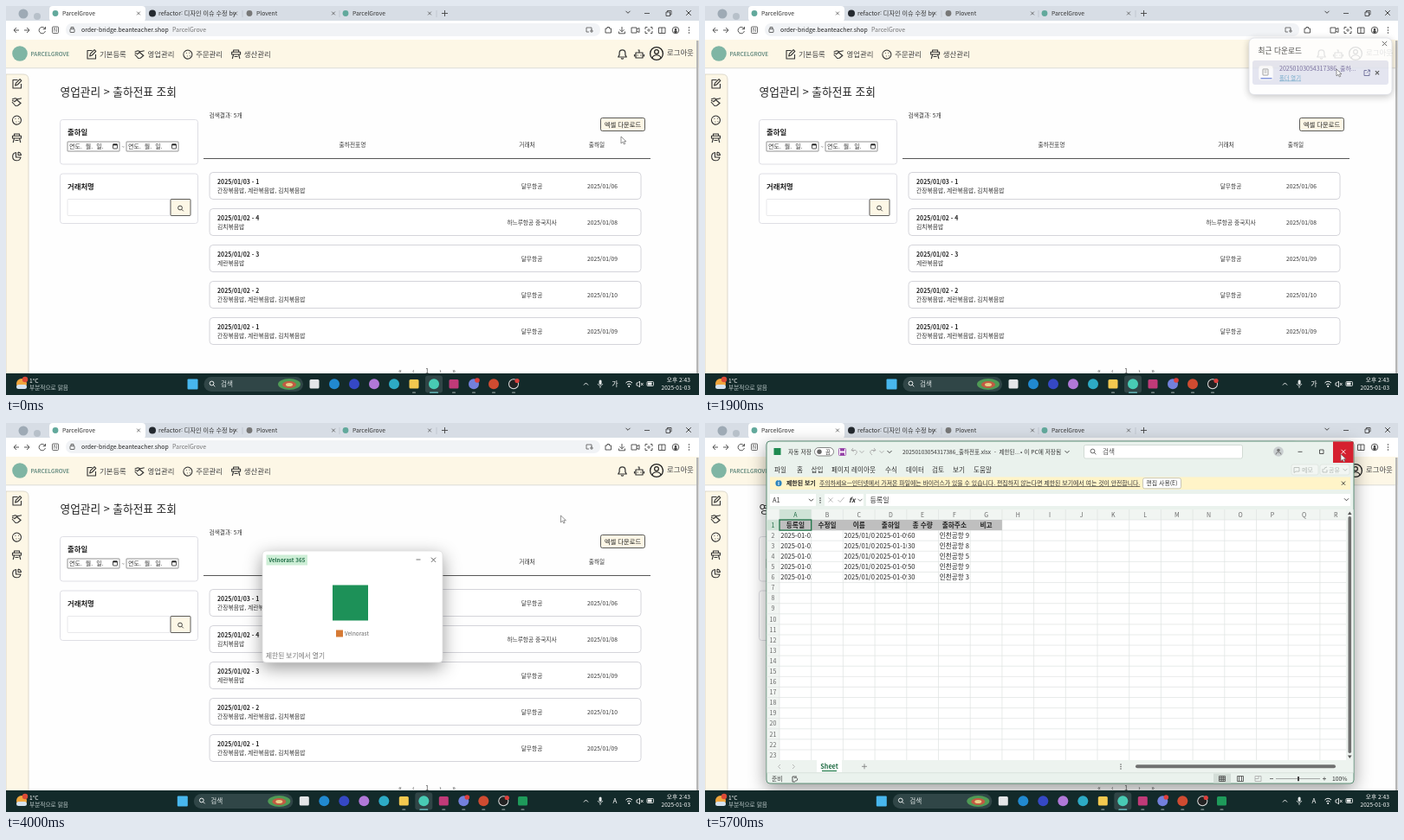
An HTML page for the animation above (5.8 s loop, 800 px wide and 450 px high).

```html
<!DOCTYPE html>
<html lang="ko">
<head>
<meta charset="utf-8">
<style>
html, body { margin: 0; width: 100%; height: 100%; overflow: hidden; background: #fff; }
svg { display: block; }
text { font-family: "Noto Sans CJK KR", "Noto Sans", sans-serif; white-space: pre; }
.soft { filter: drop-shadow(0 2px 4px #0004); }
.deep { filter: drop-shadow(0 6px 10px #0006); }
</style>
</head>
<body>
<svg id="stage" width="800" height="450" viewBox="0 0 800 450"></svg>
<script>
const LOOP = 5800, INK = '#333', CREAM = '#fdf7e6';

// Drawing helpers, each returns SVG markup
const rect = (x, y, w, h, fill, more = '') =>
  `<rect x="${x}" y="${y}" width="${w}" height="${h}" fill="${fill}" ${more}/>`;
const box = (x, y, w, h, r, fill, stroke, more = '') =>
  rect(x, y, w, h, fill, `rx="${r}" stroke="${stroke}" stroke-width=".8" ${more}`);
const disc = (x, y, r, fill, more = '') => `<circle cx="${x}" cy="${y}" r="${r}" fill="${fill}" ${more}/>`;
const ring = (x, y, r, stroke = INK, w = 1) => disc(x, y, r, 'none', `stroke="${stroke}" stroke-width="${w}"`);
const line = (d, stroke = INK, w = 1, x = 0, y = 0) =>
  `<path d="${d}" transform="translate(${x} ${y})" fill="none" stroke="${stroke}" stroke-width="${w}" stroke-linejoin="round"/>`;
const text = (x, y, s, size = 6.7, fill = INK, more = '') =>
  `<text x="${x}" y="${y}" font-size="${size}" fill="${fill}" ${more}>${s}</text>`;
const group = (id, body, more = '') => `<g id="${id}" ${more}>${body}</g>`;
const each = (list, fn) => list.map(fn).join('');
const MID = 'text-anchor="middle"', END = 'text-anchor="end"', BOLD = 'font-weight="700"', SEMI = 'font-weight="500"';
const cross = (x, y, r = 2.5, c = INK, w = .9) => line(`M${-r} ${-r}L${r} ${r}M${r} ${-r}L${-r} ${r}`, c, w, x, y);
const chevron = (x, y, c = INK) => line('M-2.5-1.2L0 1.3L2.5-1.2', c, .9, x, y);
const lens = (x, y, c = INK) => ring(x - .5, y - .5, 2.4, c, .9) + line('M1.3 1.3L3.3 3.3', c, .9, x, y);

const icons = {
  edit: 'M1-4.5H-4.5V5H5V0M-1.8 2L-1-.8L3.6-5.3L5.3-3.6L.8 1Z',
  deal: 'M-5.5-3L-2-4.2L1-3.2L5.5-4.2M-5.5 0L-1.5 4.5L1 4.2L5 1M-3 0L0-2.5L4.5 1.5M-5.5-1.5L-3-1',
  order: 'M-2-4.5A5 5 0 1 1-4.7 1.8A5 5 0 0 1-2-4.5M-2-1.5h.8M1.5-1.8h.8M-1 2h.8M2 1.8h.8',
  make: 'M-5-2.8H5V0H-5ZM-3 0L-4.3 5M3 0L4.3 5M-3-2.8V-5H3V-2.8M-2 2.5H2',
  pie: 'M-1-4.5A4.7 4.7 0 1 0 4.5 1H-1ZM1.5-5V-1.5H5A4 4 0 0 0 1.5-5',
  bell: 'M-4.8 3H4.8L3.4 .6V-1.5A3.4 3.6 0 0 0-3.4-1.5V.6ZM-1.3 4.2A1.4 1.4 0 0 0 1.3 4.2',
  bot: 'M-4-2H4V4H-4ZM-5.5 0V2.5M5.5 0V2.5M0-2V-5H-1.5M-1.8 .6V1.4M1.8 .6V1.4'
};
const icon = (name, x, y, w = 1.1) => line(icons[name], INK, w, x, y);

function browser() {
  const tab = (x, s, c) => disc(x, 8.5, 3.4, c) + text(x + 8, 11.2, s, 6.8);
  return rect(0, 0, 800, 18, '#d7dde5') +
    disc(20, 9, 5.5, '#9eaab5') + disc(36, 12, 4, '#b7c0c9') +
    rect(50, 0, 111, 18, '#fff', 'rx="4"') + rect(0, 17, 800, 22, '#fff') +
    tab(57, 'ParcelGrove', '#62a99c') + disc(169, 8.5, 4, '#24292f') +
    text(176, 11.2, 'refactor: 디자인 이슈 수정 by', 7.1) + tab(281, 'Plovent', '#777') + tab(392, 'ParcelGrove', '#62a99c') +
    each([153, 265, 378, 489], x => cross(x, 8.5, 1.9, '#555', .8)) +
    line('M273 5V13M385 5V13M497 5V13', '#b3bbc4', .6) + line('M503 8.5H510M506.5 5V12', '#444', .9) +
    chevron(718, 7) + line('M737 8.5H743M762 7H766.5V11.5H762ZM763.5 7V5.5H768V10H766.5', INK, .8) + cross(788, 8, 2.8) +
    line('M12 25L9 28L12 31M9 28H15M24 25L27 28L24 31M21 28H27', '#444', .9) +
    line('M45 26.2A3.7 3.7 0 1 0 45.4 29M45.5 24V26.8H42.7', '#444', .9) +
    box(53.5, 24, 7, 7.5, 1, '#fff', '#444') + text(57, 30, 'N', 5.5, INK, MID) +
    rect(69, 20, 617, 15, '#f1f3f6', 'rx="7"') + box(74, 26.5, 5, 4, .5, 'none', '#444') + line('M75 26.5V24.5H78V26.5', '#444', .8) +
    text(87, 30.3, 'order-bridge.beanteacher.shop', 6.9, '#222') + text(192, 30.3, 'ParcelGrove', 7, '#777') +
    line('M670 25H676V28M670 25V30H673M674 29H678M676 27V31', '#555', .8) +
    line('M692 26H694V24.5H696.5V26H698.5V31H692ZM722 25H728V31H722ZM728 27L731 25.5V30.5L728 29M738 27V24.5H740.5M744 24.5H746V27M746 29V31.5H744M740.5 31.5H738V29M753.5 25H761V31.5H753.5ZM757 25V31.5', '#444', .9) +
    group('getIcon', line('M711 24V29.5M708.5 27.3L711 29.8L713.5 27.3M707.5 29.5V31.8H714.5V29.5', '#444', .9)) +
    ring(742, 28, 1.2, '#444', .8) + ring(773, 28, 3.8, '#444', .9) + disc(773, 27, 1.3, '#444') + disc(773, 29.8, 1.8, '#444') +
    each([25, 28, 31], y => disc(788.5, y, .8, '#444'));
}

function page() {
  const rows = [
    ['03 - 1', '간장볶음밥, 계란볶음밥, 김치볶음밥', '달무항공', '06'],
    ['02 - 4', '김치볶음밥', '하느루항공 중국지사', '08'],
    ['02 - 3', '계란볶음밥', '달무항공', '09'],
    ['02 - 2', '간장볶음밥, 계란볶음밥, 김치볶음밥', '달무항공', '10'],
    ['02 - 1', '간장볶음밥, 계란볶음밥, 김치볶음밥', '달무항공', '09']];
  const names = ['edit', 'deal', 'order', 'make'];
  const date = x => box(x, 157, 60, 11, .5, '#fff', '#777') + text(x + 2, 165.2, '연도. 월. 일.', 7, INK, 'word-spacing="2"') +
    box(x + 52.5, 160, 5, 5, .5, 'none', '#222') + rect(x + 52.5, 159.5, 5, 1.8, '#222');
  return rect(0, 39, 800, 386, '#fefefe') + rect(0, 39, 800, 32.5, CREAM) + line('M0 71.8H797', '#d3d3cd', .8) +
    disc(16, 55, 8.8, '#7fb5a4') + text(28.5, 57.5, 'PARCELGROVE', 6.6, '#35695f', SEMI) +
    each(['기본등록', '영업관리', '주문관리', '생산관리'], (s, i) =>
      icon(names[i], 98.5 + 55.7 * i, 56) + text(108 + 55.6 * i, 58.8, s, 8.4, '#444')) +
    icon('bell', 711.5, 56, 1.2) + icon('bot', 731, 56, 1.2) + ring(751, 55, 7.4, '#222', 1.3) +
    ring(751, 53, 2.4, '#222', 1.2) + line('M746 60A5.2 4.5 0 0 1 756 60', '#222', 1.2) +
    text(763, 57, '로그아웃', 8.4, '#444') + rect(797, 40, 2.5, 385, '#b5b5b5') +
    `<path d="M0 79H20Q26 79 26 85V425H0Z" fill="${CREAM}" stroke="#d5d0c2" stroke-width=".8"/>` +
    each([...names, 'pie'], (n, i) => icon(n, 12.5, 90 + 21 * i)) +
    text(62.5, 104, '영업관리 &gt; 출하전표 조회', 12.7, '#222', SEMI) +
    box(62.5, 131.5, 159, 51.5, 3, '#fff', '#d6d6de') + text(71, 149.2, '출하일', 8.4, '#222', BOLD) +
    date(71) + text(133.5, 165, '~', 6) + date(139) +
    box(62.5, 194, 159, 57.5, 3, '#fff', '#d6d6de') + text(71, 211.8, '거래처명', 8.4, '#222', BOLD) +
    box(71, 223.5, 119, 19, 1, '#fff', '#e2e2e6') + box(190, 223.5, 23, 19, 1, CREAM, '#333') + lens(201.5, 234) +
    text(234.5, 128.8, '검색결과: 5개') +
    box(686.5, 129.5, 51, 15, 2, CREAM, '#333') + text(712, 139.7, '엑셀 다운로드', 7.3, '#222', MID) +
    text(400, 163.2, '출하전표명', 6.7, INK, MID) + text(601.5, 163.2, '거래처', 6.7, INK, MID) + text(682, 163.2, '출하일', 6.7, INK, MID) +
    line('M228 176.5H744', '#444', .9) +
    each(rows, ([no, menu, who, day], i) => {
      const y = 192.5 + 42 * i;
      return box(235, y, 498, 31, 4, '#fff', '#c9c9d1') + text(244, y + 13, '2025/01/' + no, 6.9, '#222', BOLD) +
        text(244, y + 23.3, menu, 6.8) + text(607, y + 18.3, who, 6.7, INK, MID) +
        text(688.5, y + 18.3, '2025/01/' + day, 6.7, INK, MID);
    }) +
    each(['«', '‹', '1', '›', '»'], (s, i) => text(455 + 15.5 * i, 424.6, s, 7.5, '#444', MID));
}

function popup() {
  return box(628, 37, 165, 65.5, 6, '#fff', '#d9dbe2', 'class="soft"') +
    text(638.5, 54.5, '최근 다운로드', 8.7, INK, SEMI) + cross(784.5, 43.5, 2.6, '#444') +
    rect(632, 63, 157, 28, '#e0e2ee', 'rx="3" id="hover"') +
    box(639, 69, 17, 17, 3, '#fafafc', '#e6e6ec') + box(644, 73, 6, 7, .5, '#fff', '#777') + line('M645.5 75H648.5M645.5 77H648.5', '#777', .7) +
    rect(641.5, 83, 13, 1.4, '#6d83d6') +
    group('fileFull', text(663, 75, '20250103054317386_출하전표.xlsx', 7, '#777')) +
    group('fileHot', text(663, 75, '20250103054317386_출하...', 7, '#665b92') +
      text(663, 85.5, '폴더 열기', 6.3, '#5b9ac0', 'text-decoration="underline"') +
      line('M764 74.5H761V80.5H767V77.5M765 74H767.5V76.5M767.5 74L764 77.5', '#55568a', .9) + cross(776, 77.3, 2.1, '#444', 1.2));
}

function splash() {
  return box(296, 148, 208, 129, 4, '#fff', '#ddd', 'class="deep" id="panel"') +
    group('splashBody', rect(300.5, 152.5, 47.5, 12, '#cdeed6') + text(324.3, 161, 'Velnorast 365', 6.3, '#24704a', MID + BOLD) +
      line('M473.5 158H478.5', '#555', .8) + cross(493.5, 158.3, 2.6, '#555') +
      rect(377, 187.5, 41, 41, '#1d9158') + rect(381, 239.5, 8, 8, '#d67a35') + text(391, 246.3, 'Velnorast', 6.4, '#666', SEMI) +
      text(300, 272, '제한된 보기에서 열기', 7.7, '#777'));
}

function sheet() {
  const W = 36.7, H = 12.09, X = 86, Y = 112;
  const menus = [[80, '파일'], [106, '홈'], [122.5, '삽입'], [146, '페이지 레이아웃'], [208, '수식'], [232, '데이터'], [262, '검토'], [286, '보기'], [310, '도움말']];
  const amounts = [60, 30, 10, 50, 30], gates = [9, 8, 5, 9, 3];
  const cell = (c, r, s) => `<svg x="${X + W * c}" y="${Y + H * r}" width="${W}" height="${H}">${text(1.2, 8.9, s, 7.6, '#222')}</svg>`;
  let grid = '', marks = '';
  for (let c = 0; c < 18; c++) {
    grid += `M${X + W * c} 100V390`;
    marks += text(X + W * (c + .5), 108.7, String.fromCharCode(65 + c), 7, c ? '#666' : '#1f6b43', MID);
  }
  for (let r = 0; r < 23; r++) {
    grid += `M71 ${Y + H * r}H740`;
    marks += text(78.5, Y + 8.7 + H * r, r + 1, 7, r ? '#666' : '#1f6b43', MID);
  }
  return rect(71, 21, 678, 396, '#eaf2ed', 'rx="4" stroke="#5d8f76" class="deep"') +
    rect(79.5, 29, 8, 8, '#1d8a50') + text(96, 35.9, '자동 저장', 6.8) + box(126.5, 28.5, 22, 9.5, 4.7, '#fff', '#666') +
    disc(132, 33.2, 2.7, '#666') + text(139, 35.7, '끔', 6.3) +
    box(154.5, 29.5, 8, 8, .8, '#fff', '#9440a6') + rect(156, 29.5, 5, 3, '#9440a6') + rect(156, 34.5, 5, 3, '#9440a6') +
    line('M171 29L169 31.5L172 33M169 31.5H174Q177 34 173 37M195 29L197 31.5L194 33M197 31.5H192Q189 34 193 37', '#aaa', .9) +
    chevron(181, 33.3, '#aaa') + chevron(204, 33.3, '#aaa') + chevron(213, 33.3) +
    text(228, 35.9, '20250103054317386_출하전표.xlsx  -  제한된...', 6.5) + text(364, 35.9, '• 이 PC에 저장됨', 6.7) + chevron(418, 33.3) +
    box(437.5, 25.5, 183, 15.5, 2, '#fff', '#c9d4cd') + lens(448, 33, '#555') + text(459, 36, '검색', 7.6, '#555') +
    disc(662, 33, 5.8, '#c9ced0') + disc(662, 31.5, 1.8, '#777') + line('M659 36.5A3 2.7 0 0 1 665 36.5', '#777', .9) +
    rect(725, 21.5, 23.5, 24.5, '#d5202f', 'id="closeHot"') +
    line('M684.5 33.3H689.5M709.5 31H714V35.5H709.5Z', INK, .8) + group('closeDark', cross(737, 33.3)) + group('closeLight', cross(737, 33.3, 2.5, '#fff')) +
    each(menus, ([x, s]) => text(x, 57, s, 7.6)) +
    box(677, 48, 31, 12, 2, '#f2f6f3', '#dde4df') + text(689, 56.8, '메모', 7, '#b2b8b4') + line('M680 51.5H686V56H682L680 57.5Z', '#b2b8b4', .8) +
    box(710, 48, 34, 12, 2, '#f2f6f3', '#dde4df') + text(720, 56.8, '공유', 7, '#b2b8b4') + line('M713 53V57H718V54M714.5 54Q715 51 718 51', '#b2b8b4', .8) + chevron(739, 54, '#b2b8b4') +
    rect(75, 62.5, 670, 14.5, '#fff4c8') + disc(85, 69.7, 3.6, '#2d84bd') + text(85, 72.2, 'i', 6.5, '#fff', MID + BOLD) +
    text(94, 72.2, '제한된 보기', 6.9, '#222', BOLD) +
    text(132, 72.2, '주의하세요—인터넷에서 가져온 파일에는 바이러스가 있을 수 있습니다. 편집하지 않는다면 제한된 보기에서 여는 것이 안전합니다.', 6.88, INK, 'text-decoration="underline"') +
    box(505.5, 63.8, 44, 12, 2, '#fff', '#b9b9ad') + text(527.5, 72.2, '편집 사용(E)', 6.9, INK, MID) + cross(737, 69.7, 2.1) +
    rect(75, 82, 53, 14, '#fff') + text(78, 91.8, 'A1', 7.5) + chevron(122.5, 89) + each([87, 89.5, 92], y => disc(133, y, .8, '#444')) +
    rect(138, 82, 45, 14, '#fff') + cross(145, 89, 2.6, '#bbb') + line('M153.5 89L156 91.5L160.5 86', '#bbb') + text(166, 92, 'fx', 8, INK, 'font-style="italic" font-weight="700"') + chevron(179, 89, '#666') +
    rect(186, 82, 559, 14, '#fff') + text(190.5, 91.9, '등록일', 8) + chevron(740.5, 88.5) +
    rect(71.5, 100, 668.5, 290, '#f1f5f2') + rect(X, Y, 654, 278, '#fff') + rect(X, 100, W, 12, '#cfe3d6') + rect(71.5, Y, 14.5, H, '#cfe3d6') +
    line(grid, '#dfe3e1', .7) + rect(X, Y, W * 7, H, '#bfbfbf') + marks +
    each(['등록일', '수정일', '이름', '출하일', '총 수량', '출하주소', '비고'], (s, c) => text(X + W * (c + .5), 120.8, s, 7.7, '#222', MID + BOLD)) +
    each(amounts, (n, i) => cell(0, i + 1, '2025-01-03') + cell(2, i + 1, '2025/01/02') +
      cell(3, i + 1, i == 1 ? '2025-01-10' : '2025-01-09') + cell(4, i + 1, n) + cell(5, i + 1, '인천공항 ' + gates[i])) +
    rect(X, Y, W, H, 'none', 'stroke="#1d7346" stroke-width="1.3"') +
    rect(740, 100, 8.5, 290, '#edf2ef') + rect(742.5, 108, 3.6, 274, '#707070', 'rx="1.8"') +
    '<path d="M742 106H746.6L744.3 102.5ZM742 384.5H746.6L744.3 388ZM493.5 395V399.6L490.5 397.3ZM734 395V399.6L737 397.3Z" fill="#555"/>' +
    rect(71.5, 390, 677, 14.5, '#edf3ef') + line('M87 395L84.5 397.5L87 400M101 395L103.5 397.5L101 400', '#aaa', .8) +
    rect(129, 390, 29, 14, '#fff') + text(143.5, 399.5, 'Sheet', 7.2, '#1f6b43', MID + BOLD) + line('M135 402.5H152', '#1f7a48', 1.2) +
    line('M181 397.3H187M184 394.3V400.3', '#777', .8) + each([395, 397.5, 400], y => disc(480, y, .7, '#444')) + rect(497, 395.3, 231, 4, '#707070', 'rx="2"') +
    line('M71.5 404.7H748.5', '#d3ddd7', .7) + text(77, 414, '준비', 6.8) + line('M101 409H106M101 409V415H104M103 411A2 2 0 1 1 104 414', '#444', .9) +
    rect(587, 405.5, 20, 11, '#d3ddd7') + line('M593.5 408.5H600.5V414.5H593.5ZM593.5 410.5H600.5M593.5 412.5H600.5M596 408.5V414.5M598.3 408.5V414.5M614.5 408.5H621.5V414.5H614.5ZM616.5 408.5V414.5M619.5 408.5V414.5', '#444', .8) +
    line('M635 408.5H642V414.5H635ZM635 411.5H639V408.5', '#aaa', .8) +
    line('M652 411.5H656M713 411.5H717M715 409.5V413.5', '#555', .8) + line('M659 411.5H710', '#888', .7) + rect(684, 409, 2, 5.2, '#444') + text(724, 414, '100%', 6.8);
}

function taskbar() {
  const apps = ['#e4e6e8', '#2189d0', '#3548c4', '#b078d8', '#2daac5', '#f3c94f', '#48cbb4', '#c03a78', '#7380dc', '#cf4b31', '#dedede', '#1e9a5a'];
  const square = [0, 5, 7, 11];
  const app = (c, i) => {
    const x = 356 + 23 * i;
    return group('app' + i, (i == 6 ? rect(x - 10, 427.5, 20, 20, '#304546', 'rx="3"') : '') +
      (square.includes(i) ? rect(x - 5.5, 432, 11, 10.5, c, 'rx="1.5"') : disc(x, 437.2, 6, c)) +
      (i == 10 ? disc(x, 437.2, 5, '#222') + disc(x + 4, 433.5, 2.6, '#dc3f3c') : '') +
      (i == 8 ? disc(x + 4, 433, 2.8, '#dc3f3c') : '') +
      (i > 4 ? rect(x - (i == 6 ? 5 : 2), 446.6, i == 6 ? 10 : 4, 1.2, i == 6 ? '#71cfd0' : '#8c9999', 'rx=".6"') : ''));
  };
  return rect(0, 425, 800, 25, '#132a2a') + disc(18, 437, 6, '#f0a63e') + rect(12, 438, 12, 5, '#d4e2ef', 'rx="2.5"') +
    disc(22, 432, 3.2, '#db4a37') + text(27, 435.6, '1°C', 6.7, '#fff') + text(27, 444, '부분적으로 맑음', 6.7, '#b9c6c6') +
    group('start', rect(209.5, 431.5, 12, 12, '#48b7ee', 'rx="1"') + rect(228.5, 429, 114.5, 17, '#304647', 'rx="8.5"') + lens(238, 437, '#fff') + text(248, 440, '검색', 7.6, '#dfe6e6') +
      '<ellipse cx="327" cy="437.5" rx="13" ry="6.5" fill="#4f9a55"/><ellipse cx="327" cy="438" rx="8" ry="4" fill="#c35a43"/><ellipse cx="327" cy="438" rx="4" ry="2" fill="#e6cf86"/>') +
    each(apps, app) +
    line('M667 438.5L669.5 436L672 438.5', '#fff', .9) + rect(684.6, 432.5, 3, 5.5, '#e5eaea', 'rx="1.5"') + line('M683 437Q686 442 689 437M686 440V442', '#e5eaea', .8) +
    `<text id="ime" x="703" y="440" font-size="8" fill="#fff" ${MID}></text>` +
    line('M715.5 436Q719 432.5 723 436M717 438Q719.2 436 721.5 438', '#fff', 1) + disc(719.2, 440, 1, '#fff') +
    line('M728 436H729.5L731.5 434V441L729.5 439H728ZM733 436L735.5 439M735.5 436L733 439', '#fff', .8) +
    box(740, 434.5, 7.5, 5, 1, 'none', '#fff') + rect(741, 435.5, 4.5, 3, '#fff') +
    text(790, 435.3, '오후 2:43', 6.7, '#fff', END) + text(790, 444.3, '2025-01-03', 6.5, '#fff', END);
}

stage.innerHTML = browser() + page() + group('popup', popup()) + group('splash', splash()) + group('sheet', sheet()) + taskbar() +
  group('arrow', '<path d="M0 0V8L2 6.2L3.4 9L4.7 8.4L3.4 5.7H6Z" fill="#fff" stroke="#666" stroke-width=".7"/>') +
  group('busy', ring(5, 0, 2.8, '#1683c8', 1.7)) + group('plus', line('M0-.5V6.5M-3.5 3H3.5', '#fff', 3) + line('M0-.5V6.5M-3.5 3H3.5', '#222', 1.3));

const $ = id => document.getElementById(id);
const clamp = (v, a = 0, b = 1) => Math.min(b, Math.max(a, v));
const ramp = (t, from, to) => clamp((t - from) / (to - from));
const fade = (id, v) => $(id).setAttribute('opacity', +v);
const move = (id, s) => $(id).setAttribute('transform', s);
const zoom = (x, y, k) => `translate(${x} ${y}) scale(${k}) translate(${-x} ${-y})`;

// Pointer stops: time, x, y
const stops = [[0, 710, 151], [100, 710, 151], [500, 625, 147], [1100, 625, 147], [1700, 729, 73], [2100, 729, 73],
  [2500, 660, 101], [2900, 641, 107], [4900, 640, 107], [5500, 734, 36], [LOOP, 734, 36]];
function pointer(t) {
  const i = stops.findIndex(s => s[0] > t), [a, x, y] = stops[i - 1], [b, u, v] = stops[i];
  const p = (t - a) / (b - a), e = p * p * (3 - 2 * p);
  return [x + (u - x) * e, y + (v - y) * e];
}

function draw(t) {
  const [x, y] = pointer(t), open = t >= 4100;
  const shown = t >= 500 && t < 2200, hot = shown && x > 632 && y < 91 && y > 63;
  fade('popup', shown ? .4 + .46 * ramp(t, 500, 700) : 0);
  move('popup', `translate(0 ${shown ? 2 * (1 - ramp(t, 500, 700)) : 0})`);
  fade('hover', hot);
  fade('fileHot', hot);
  fade('fileFull', !hot);
  fade('getIcon', !shown);

  fade('splash', t >= 2500 && t < 4100);
  fade('panel', .35 + .65 * ramp(t, 2500, 2700));
  fade('splashBody', t >= 2800);
  move('splash', zoom(400, 212, .99 + .01 * ramp(t, 2500, 2700)));

  fade('sheet', open ? .5 + .5 * ramp(t, 4100, 4300) : 0);
  move('sheet', zoom(410, 219, .94 + .06 * ramp(t, 4100, 4300)));
  const closing = open && x > 725 && y < 46;
  fade('closeHot', closing);
  fade('closeLight', closing);
  fade('closeDark', !closing);

  // Taskbar icons make room one after another
  const slide = i => -clamp((t - 3400) / 10 - 2 * i, 0, 11.7);
  move('start', `translate(${slide(-.2)} 0)`);
  for (let i = 0; i < 12; i++) move('app' + i, `translate(${i < 11 ? slide(i) : -12.5} 0)`);
  fade('app11', t >= 3400);
  $('ime').textContent = t < 3300 ? '가' : 'A';

  const overCells = open && y > 100;
  for (const id of ['arrow', 'busy', 'plus']) move(id, `translate(${x} ${y})`);
  fade('arrow', !overCells);
  fade('plus', overCells);
  fade('busy', t >= 2200 && t < 3000);
}

function tick() {
  draw(Math.floor(performance.now() % LOOP / 100) * 100);
  requestAnimationFrame(tick);
}
tick();
</script>
</body>
</html>
```
